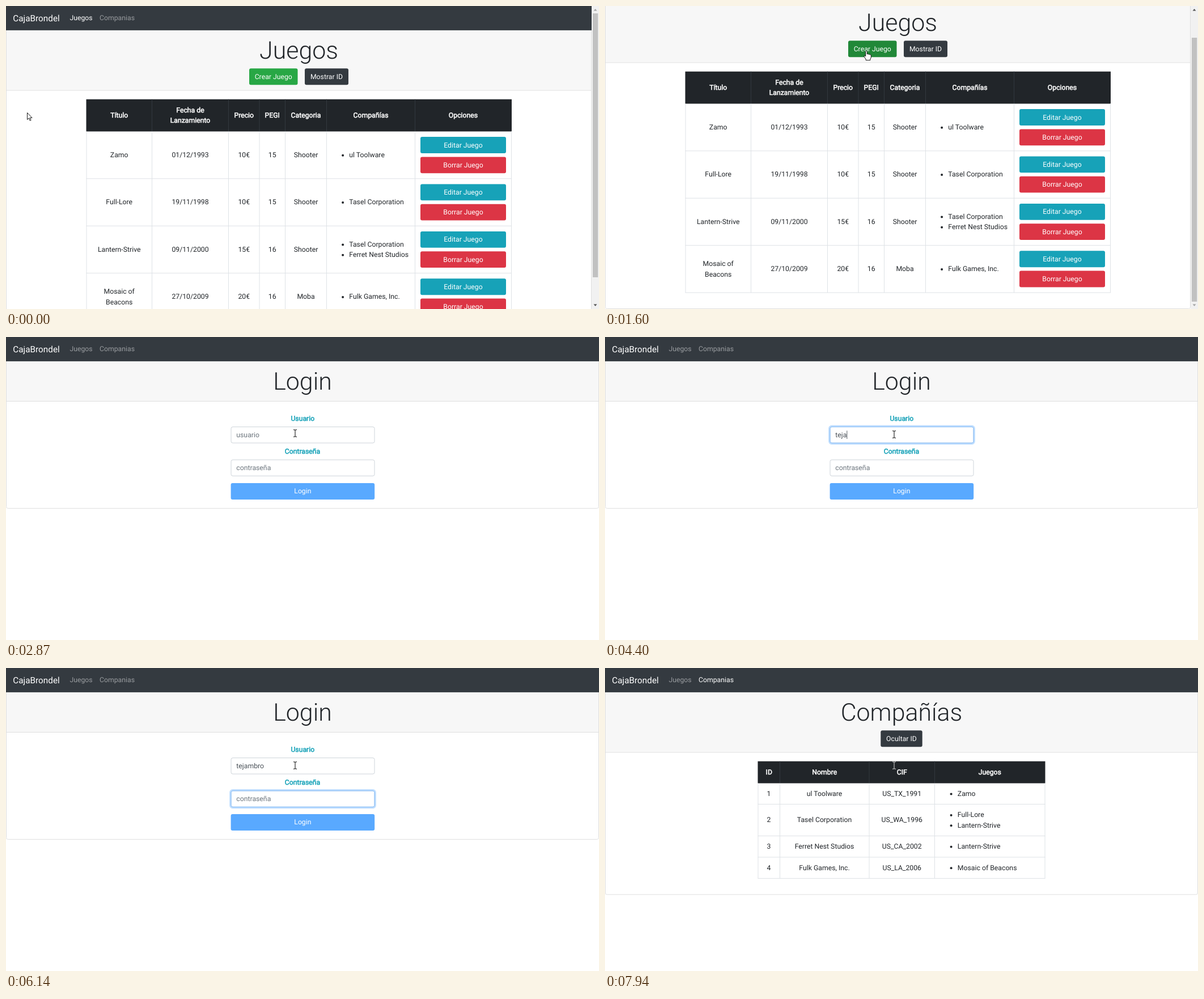
Animation of 1046x535 px, one loop 8000 ms. Source, as an HTML page:

```html
<!DOCTYPE html>
<html lang="es">
<head>
<meta charset="utf-8">
<title>Juegos</title>
<style>
html, body { margin: 0; width: 100%; height: 100%; overflow: hidden; background: #fff; }
svg { display: block; font: 12.25px Roboto, sans-serif; text-rendering: geometricPrecision; }
</style>
</head>
<body>
<svg id="stage" width="1046" height="535" viewBox="0 0 1046 535"></svg>
<script>
const TICK = 1000 / 15, LOOP = 8000;
const INK = '#212529', DARK = '#343a40', LINE = '#dee2e6', EDGE = '#dfdfdf';
const BRAND = 'CajaBrondel', USER = 'tejambro';
const GAMES = ['Zamo', 'Full-Lore', 'Lantern-Strive', 'Mosaic of Beacons'];
const FIRMS = ['ul Toolware', 'Tasel Corporation', 'Ferret Nest Studios', 'Fulk Games, Inc.'];

// ---- drawing helpers ----
const rect = (x, y, w, h, fill, more = '') =>
  `<rect x="${x}" y="${y}" width="${w}" height="${h}" fill="${fill}" ${more}/>`;

// y is the middle of the text line
const text = (x, y, str, fill = INK, more = '', size = 12.25) =>
  `<text x="${x}" y="${y + size * 0.342}" font-size="${size}" fill="${fill}" ${more}>${str}</text>`;

const MID = 'text-anchor="middle"';
const center = (x, y, str, fill) => text(x, y, str, fill, MID);
const bold = (x, y, str, fill) =>
  text(x, y, str, fill, `${MID} stroke="${fill}" stroke-width=".55"`);

const lines = (x, y, list, put) =>
  list.map((s, i) => put(x, y + (i - (list.length - 1) / 2) * 18.4, s)).join('');

const bullets = (x, y, list) => lines(x, y, list, (px, py, s) =>
  `<circle cx="${px - 11.2}" cy="${py + 0.8}" r="2" fill="${INK}"/>` + text(px, py, s));

const button = (x, y, w, label, fill, id = '') =>
  rect(x, y, w, 28.9, fill, `rx="3" ${id && `id="${id}"`}`) + center(x + w / 2, y + 14.3, label, '#fff');

const stroke = (d, color) => `<path d="${d}" fill="none" stroke="${color}"/>`;

function navbar(w, active) {
  const link = (x, s) => text(x, 21, s, s === active ? '#fff' : '#999c9f');
  return rect(0, 0, w, 42.9, DARK) + text(12.3, 21.3, BRAND, '#fff', '', 15.3) +
    link(112.4, 'Juegos') + link(165, 'Companias');
}

const frame = (w, bottom) =>
  stroke(`M.5 0V${bottom - 3}q0 3 3 3H${w - 3.5}q3 0 3-3V0`, EDGE);

const header = (w, bottom, title) =>
  rect(0, 42, w, bottom - 42, '#f7f7f7') +
  stroke(`M0 ${bottom + 0.5}H${w}`, EDGE) +
  text(w / 2, 78.6, title, INK, `${MID} font-weight="300"`, 42.9);

function table(xs, ys, heads) {
  const [left, right] = [xs[0], xs[xs.length - 1]];
  const [top, body] = ys, end = ys[ys.length - 1];
  const mid = i => (xs[i] + xs[i + 1]) / 2;
  return rect(left - 0.5, top, right - left + 1, body - top, INK) +
    stroke(xs.slice(1, -1).map(x => `M${x} ${top}V${body}`).join(''), '#32383e') +
    stroke(xs.map(x => `M${x} ${body}V${end}`).join('') +
      ys.slice(2).map(y => `M${left - 0.5} ${y}H${right + 0.5}`).join(''), LINE) +
    heads.map((h, i) => lines(mid(i), (top + body) / 2, h.split('|'),
      (x, y, s) => bold(x, y, s, '#fff'))).join('');
}

// ---- pages ----
function gamesPage() {
  const xs = [142, 257.5, 392.5, 447, 492.5, 565.5, 721.5, 891.5];
  const ys = [164.7, 221.5, 304.8, 388.3, 471.7, 555.1];
  const rows = [
    [[GAMES[0]], '01/12/1993', '10€', 15, 'Shooter', [FIRMS[0]]],
    [[GAMES[1]], '19/11/1998', '10€', 15, 'Shooter', [FIRMS[1]]],
    [[GAMES[2]], '09/11/2000', '15€', 16, 'Shooter', [FIRMS[1], FIRMS[2]]],
    [['Mosaic of', 'Beacons'], '27/10/2009', '20€', 16, 'Moba', [FIRMS[3]]]
  ];
  const body = rows.map((r, i) => {
    const y = ys[i + 1] + 41.5;
    return lines(199.7, y, r[0], center) +
      r.slice(1, 5).map((s, j) => center((xs[j + 1] + xs[j + 2]) / 2, y, s)).join('') +
      bullets(605.3, y, r[5]) +
      button(731, y - 31.9, 151, 'Editar Juego', '#17a2b8') +
      button(731, y + 3.4, 151, 'Borrar Juego', '#dc3545');
  }).join('');
  return header(1033, 148.5, 'Juegos') + frame(1033, 583.5) +
    rect(427.7, 109, 88, 31.4, 'none',
      'id="clickRing" rx="4.2" stroke="#48b461" stroke-opacity=".5" stroke-width="2.5"') +
    button(429, 110.3, 85.5, 'Crear Juego', '#28a745', 'create') +
    button(527, 110.3, 77, 'Mostrar ID', DARK) +
    table(xs, ys, ['Título', 'Fecha de|Lanzamiento', 'Precio', 'PEGI', 'Categoria', 'Compañías', 'Opciones']) +
    body + navbar(1033, 'Juegos');
}

const scrollbar = () =>
  rect(1033, 0, 13, 535, '#f1f1f1') + rect(1035, 0, 9.2, 466, '#c1c1c1', 'id="thumb"') +
  '<path id="up" d="M1036.5 8.5l3-3.4 3 3.4z"/><path id="down" d="M1036.5 526.5l3 3.4 3-3.4z"/>';

const field = (id, y) =>
  rect(397, y, 253, 28.4, '#fff', 'rx="3" stroke="#ced4da"') +
  `<g id="${id}Ring">` +
  rect(395.4, y - 1.6, 256.2, 31.6, 'none', 'rx="4.4" stroke="#007bff" stroke-opacity=".25" stroke-width="2.5"') +
  rect(397, y, 253, 28.4, 'none', 'rx="3" stroke="#80bdff"') + '</g>' +
  text(406.3, y + 14, '', '#495057', `id="${id}"`) +
  rect(406, y + 6.7, 0.9, 14.6, '#495057', `id="${id}Caret"`);

const loginPage = () =>
  header(1046, 113, 'Login') +
  bold(523.3, 143.8, 'Usuario', '#17a2b8') + field('user', 158.7) +
  '<clipPath id="cut"><rect id="cutBox" x="396" y="187.6" width="255"/></clipPath>' +
  '<g id="alert" clip-path="url(#cut)">' +
  rect(397, 187, 253, 26, '#f8d7da', 'id="alertBox" rx="3" stroke="#f5c6cb"') +
  center(523, 206.2, 'Debe rellenar el usuario', '#721c24') + '</g>' +
  '<g id="lower">' + frame(1046, 302.5) +
  bold(523, 202, 'Contraseña', '#17a2b8') + field('pass', 216.9) +
  button(396.6, 258, 253.6, 'Login', '#59a9ff', 'enter') + '</g>' +
  navbar(1046);

function firmsPage() {
  const ys = [164.7, 203.5, 240.5, 296.5, 334, 371.5];
  const codes = ['US_TX_1991', 'US_WA_1996', 'US_CA_2002', 'US_LA_2006'];
  const works = [[GAMES[0]], [GAMES[1], GAMES[2]], [GAMES[2]], [GAMES[3]]];
  const rows = FIRMS.map((name, i) => {
    const y = (ys[i + 1] + ys[i + 2]) / 2 - 0.2;
    return center(289, y, i + 1) + center(387, y, name) +
      center(523.7, y, codes[i]) + bullets(621.8, y, works[i]);
  }).join('');
  return header(1046, 148.5, 'Compañías') + frame(1046, 400) +
    button(486.3, 110.3, 73.4, 'Ocultar ID', DARK) + '<g id="firmTable">' +
    table([270, 308.5, 466, 581.5, 776], ys, ['ID', 'Nombre', 'CIF', 'Juegos']) +
    rows + '</g>' + navbar(1046, 'Companias');
}

const outline = d => `<path d="${d}" fill="#fff" stroke="#000" stroke-width=".9" stroke-linejoin="round"/>`;
const cursors = () =>
  '<g id="arrow">' + outline('M.5.5V12.6L3.3 10 5.2 14.4 7.1 13.6 5.2 9.4H9Z') + '</g>' +
  '<g id="hand">' + outline('M-1.3 1.2Q0-.8 1.3 1.2V6Q2.6 5 3.8 6.3 5 5.4 6.1 6.8 7.8 6 8.3 8V12L6.8 15V16.8H-.8V15L-4 10.2Q-4.3 8.2-2.6 8.6L-1.3 10Z') + '</g>' +
  '<g id="beam"><path d="M-3-6.2H-1Q0-6 0-5 0-6 1-6.2H3M0-5V5M-3 6.2H-1Q0 6 0 5 0 6 1 6.2H3" fill="none" stroke="#000" stroke-width="1"/></g>';

const stage = document.getElementById('stage');
stage.innerHTML = `<g id="games">${gamesPage()}</g><g id="bar">${scrollbar()}</g>` +
  `<g id="login">${loginPage()}</g><g id="firms">${firmsPage()}</g>${cursors()}`;

// ---- timeline, in ticks ----
const POINTER = [[4, 37, 188], [8, 398, 164], [11, 398, 164], [15, 470, 134], [19, 470, 134],
  [24, 461, 79], [37, 461, 79], [43, 510, 170], [45, 510, 172]];
const SCROLL = [[15, 0], [16, 6], [17, 17.5], [19, 41], [21, 49]];
const ALERT = [[71, 0.05], [75, 0.75], [76, 0.66], [80, 0.5], [87, 0]];
const USER_KEYS = [[46, 0], [53, 1], [55, 2], [57, 3], [59, 4], [62, 5], [66, 4], [68, 3], [69, 2], [70, 1],
  [71, 0], [75, 1], [76, 2], [78, 3], [79, 4], [80, 5], [81, 6], [82, 7], [83, 8]];
const PASS_KEYS = [[85, 0], [94, 1], [95, 2], [97, 3], [101, 4]];

const clamp = v => Math.max(0, Math.min(1, v));
function tween(keys, k, col = 1) {
  const i = keys.findIndex(p => p[0] > k);
  if (i === 0) return keys[0][col];
  if (i < 0) return keys[keys.length - 1][col];
  const a = keys[i - 1], b = keys[i];
  return a[col] + (b[col] - a[col]) * (k - a[0]) / (b[0] - a[0]);
}
const lastKey = (keys, k) => keys.filter(p => p[0] <= k).pop() || [k, 0];

const $ = id => document.getElementById(id);
const set = (id, name, v) => $(id).setAttribute(name, v);
const show = (id, on) => set(id, 'visibility', on ? 'visible' : 'hidden');
const move = (id, x, y) => set(id, 'transform', `translate(${x} ${y})`);
const display = (id, on) => set(id, 'display', on ? 'inline' : 'none');

function updateField(id, keys, k, value, hint, start, end) {
  const [since, count] = lastKey(keys, k), el = $(id);
  const typed = value.slice(0, count);
  el.textContent = typed || hint;
  el.setAttribute('fill', typed ? '#495057' : '#6c757d');
  set(id + 'Ring', 'opacity', clamp((k - start + 1) / 2) * clamp((end + 2 - k) / 2));
  const w = typed ? el.getComputedTextLength() : 0;
  set(id + 'Caret', 'x', 406.3 + w);
  set(id + 'Caret', 'opacity', k >= start && k < end && (k - since) % 14 < 7 ? 1 : 0);
  return count;
}

function draw(ms) {
  const k = Math.floor(Math.floor(ms / 10) * 0.15 + 1e-6);
  const page = k < 35 ? 'games' : k < 110 ? 'login' : 'firms';
  for (const id of ['games', 'login', 'firms']) display(id, id === page);
  display('bar', page === 'games');

  const hover = (k >= 15 && k < 19) || (k >= 22 && k < 35);
  if (page === 'games') {
    const y = tween(SCROLL, k);
    move('games', 0, -y);
    set('thumb', 'y', 13 + y * 43 / 49);
    set('up', 'fill', y > 0 ? '#505050' : '#a3a3a3');
    set('down', 'fill', y < 49 ? '#505050' : '#a3a3a3');
    set('create', 'fill', k === 31 ? '#1e7e34' : hover ? '#218838' : '#28a745');
    set('clickRing', 'opacity', clamp((k - 30) / 2));
  } else if (page === 'login') {
    updateField('user', USER_KEYS, k, USER, 'usuario', 46, 85);
    const count = updateField('pass', PASS_KEYS, k, '••••', 'contraseña', 85, 110);
    set('enter', 'fill', count ? '#007bff' : '#59a9ff');
    const open = k >= 71 && k < 87, part = tween(ALERT, k), tall = 38.3 * part;
    display('alert', open);
    set('alert', 'opacity', part);
    set('alertBox', 'height', tall);
    set('cutBox', 'height', tall);
    move('lower', 0, open ? tall + 12.25 : 0);
  } else {
    set('firmTable', 'opacity', clamp((k - 109) / 8));
  }

  const shape = hover ? 'hand' : k >= 42 ? 'beam' : 'arrow';
  for (const id of ['arrow', 'hand', 'beam']) show(id, id === shape);
  move(shape, tween(POINTER, k, 1), tween(POINTER, k, 2));
  // the text pointer inverts over the dark table head
  $('beam').firstChild.setAttribute('stroke', page === 'firms' ? '#d8d8d8' : '#000');
}

const begin = performance.now();
function loop() {
  draw((performance.now() - begin) % LOOP);
  requestAnimationFrame(loop);
}
draw(0);
requestAnimationFrame(loop);
</script>
</body>
</html>
```
